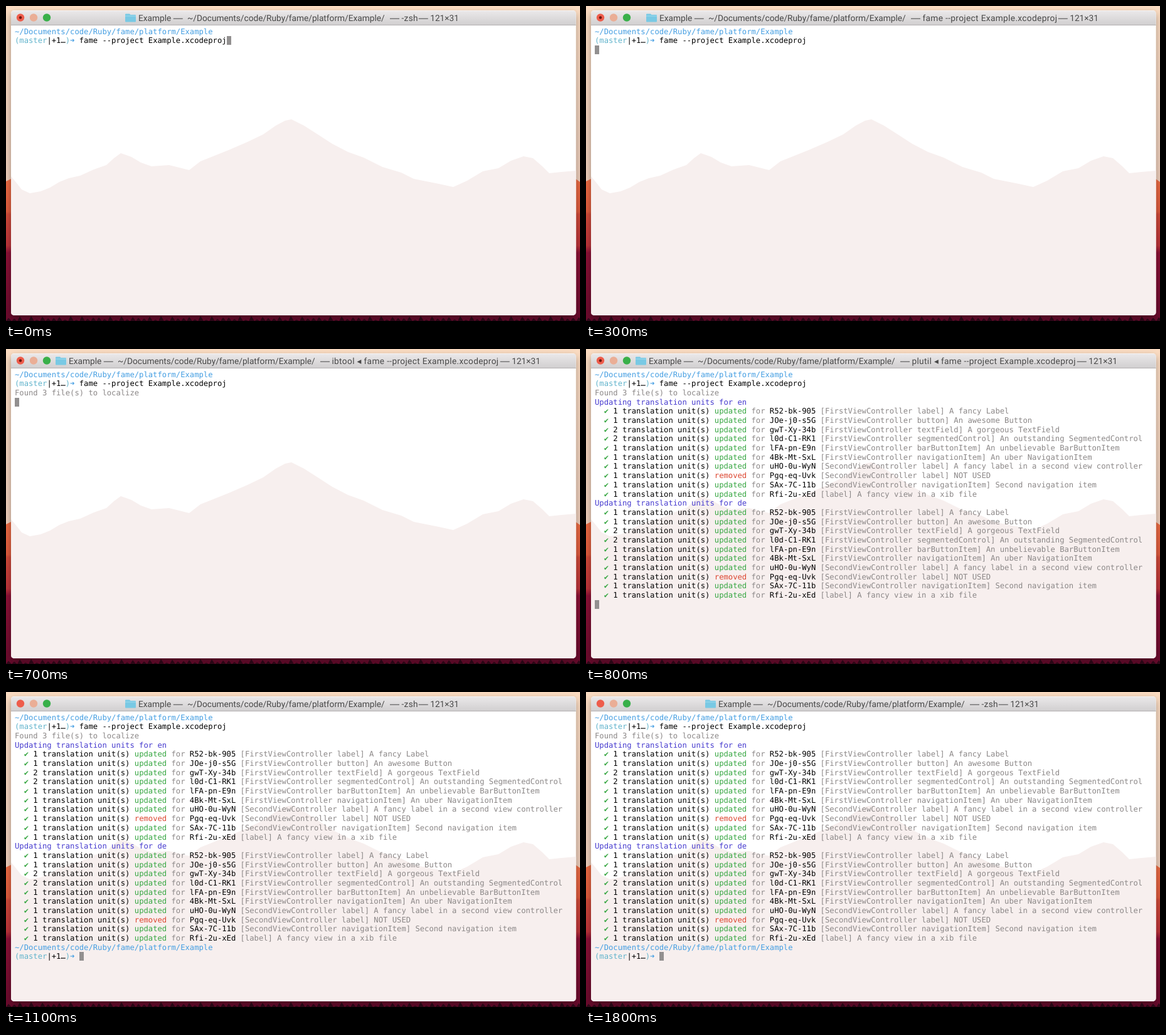
An HTML page for the animation above (2 s loop, 915 by 503 pixels).

```html
<!DOCTYPE html>
<html lang="en">
<head>
<meta charset="utf-8">
<style>
  html, body { margin: 0; width: 100%; height: 100%; overflow: hidden; }
  svg, pre { position: absolute; text-rendering: geometricPrecision; }
  svg { left: 0; top: 0; }
  svg text { font: 13.7px Roboto, sans-serif; fill: #484848; white-space: pre; }
  svg .dash { font: 15px "Liberation Sans", sans-serif; }
  pre {
    left: 14px; top: 33.6px; margin: 0; color: #000;
    font: 12.2px/14.68px "DejaVu Sans Mono", monospace;
  }
  .blue { color: #449ee2; }
  .cyan { color: #62b4cc; }
  .gray { color: #8b8787; }
  .head { color: #473ccf; }
  .green { color: #38a743; }
  .red { color: #dc4630; }
  .cursor { background: #929090; }
</style>
</head>
<body>
<svg width="915" height="503" viewBox="0 0 915 503">
  <defs>
    <linearGradient id="sky" x1="0" y1="0" x2="0" y2="1">
      <stop offset="0" stop-color="#fbdcc2"/>
      <stop offset=".4" stop-color="#efd0bc"/>
      <stop offset="1" stop-color="#e6c6b5"/>
    </linearGradient>
    <linearGradient id="hills" x1="0" y1="0" x2="0" y2="1">
      <stop offset="0" stop-color="#ec6c43"/>
      <stop offset=".23" stop-color="#dd5a3c"/>
      <stop offset=".25" stop-color="#cf4a38"/>
      <stop offset=".47" stop-color="#bb3339"/>
      <stop offset=".52" stop-color="#8c1136"/>
      <stop offset="1" stop-color="#690a2c"/>
    </linearGradient>
    <linearGradient id="bar" x1="0" y1="0" x2="0" y2="1">
      <stop offset="0" stop-color="#ebe9ea"/>
      <stop offset="1" stop-color="#d0cecf"/>
    </linearGradient>
    <filter id="shadow" x="-5%" y="-5%" width="110%" height="112%">
      <feDropShadow dx="0" dy="5" stdDeviation="6" flood-opacity=".35"/>
    </filter>
    <clipPath id="frame"><rect x="8" y="7" width="900.5" height="487" rx="5"/></clipPath>
  </defs>
  <rect width="915" height="503" fill="url(#sky)"/>
  <path d="M0 280L8 276H908L915 281V503H0Z" fill="url(#hills)"/>
  <path id="trees" fill="#300819"/>
  <rect x="8" y="7" width="900.5" height="487" rx="5" fill="#fff" filter="url(#shadow)"/>
  <g clip-path="url(#frame)">
    <path fill="#f7efee" d="M8 272L14 279 25 293 38 299 55 296 70 290 85 281 100 275 118 271 140 261
      160 254 172 243 183 235 200 241 215 250 232 256 260 254 292 262 310 248 330 240 355 230 385 217
      410 205 430 191 445 183 455 181 475 191 500 207 520 220 545 233 570 242 600 257 630 266 650 276
      690 284 713 289 735 279 760 264 785 259 805 247 825 240 840 243 855 256 866 267 885 265 909 263V494H8Z"/>
    <rect x="8" y="7" width="901" height="24" fill="url(#bar)"/>
    <path d="M8 30.5H909" stroke="#b4b1b2"/>
    <path d="M8 7.5H909" stroke="#f6f4f4"/>
  </g>
  <circle cx="23" cy="18.5" r="6.2" fill="#ee5d4c"/>
  <circle id="busy" cx="23" cy="18.5" r="2.2" fill="#6b1710"/>
  <circle cx="44" cy="18.5" r="6.2" fill="#eaae96"/>
  <circle cx="65" cy="18.5" r="6.2" fill="#39b04a"/>
  <g id="title">
    <path d="M-20 12.5H-14L-12.5 14H-5Q-4 14 -4 15V24.500Q-4 25.500 -5 25.500H-20Q-21 25.500 -21 24.500V13.500Q-21 12.500 -20 12.500Z" fill="#79c9e4"/>
    <path d="M-21 16H-4" stroke="#a4dcee"/>
    <text y="24">Example <tspan class="dash">—</tspan></text>
    <text x="78" y="24">~/Documents/code/Ruby/fame/platform/Example/</text>
    <text x="401" y="24"><tspan class="dash">—</tspan> <tspan id="command" letter-spacing=".35"></tspan></text>
    <text id="size" y="24" text-anchor="end"><tspan class="dash">—</tspan> 121×31</text>
  </g>
</svg>
<pre id="screen"></pre>
<script>
const $ = id => document.getElementById(id);
const paint = (color, text) => `<span class="${color}">${text}</span>`;

const command = 'fame --project Example.xcodeproj';
const path = paint('blue', '~/Documents/code/Ruby/fame/platform/Example');
const prompt = paint('cyan', '(master') + '|+1…' + paint('cyan', ')') + paint('blue', '➜') + ' ';
const cursor = paint('cursor', '&nbsp;');

const units = [
  'R52-bk-905 [FirstViewController label] A fancy Label',
  'JOe-j0-s5G [FirstViewController button] An awesome Button',
  'gwT-Xy-34b [FirstViewController textField] A gorgeous TextField',
  'l0d-C1-RK1 [FirstViewController segmentedControl] An outstanding SegmentedControl',
  'lFA-pn-E9n [FirstViewController barButtonItem] An unbelievable BarButtonItem',
  '4Bk-Mt-SxL [FirstViewController navigationItem] An uber NavigationItem',
  'uHO-0u-WyN [SecondViewController label] A fancy label in a second view controller',
  'Pgq-eq-Uvk [SecondViewController label] NOT USED',
  'SAx-7C-11b [SecondViewController navigationItem] Second navigation item',
  'Rfi-2u-xEd [label] A fancy view in a xib file'
].map((unit, i) => {
  const count = i === 2 || i === 3 ? 2 : 1;
  const action = i === 7 ? paint('red', 'removed') : paint('green', 'updated');
  return `  ${paint('green', '✔')} ${count} translation unit(s) ${action} ${paint('gray', 'for')} `
    + unit.slice(0, 10) + paint('gray', unit.slice(10));
});
const report = lang => [paint('head', 'Updating translation units for ' + lang), ...units];

const typed = [path, prompt + command];
const found = [...typed, paint('gray', 'Found 3 file(s) to localize')];
const updated = [...found, ...report('en'), ...report('de')];

// Title x, right edge of the title, running process, terminal lines
const states = [
  { from: 0, x: 211, end: 722, process: '-zsh', lines: [path, prompt + command + cursor] },
  { from: 200, x: 117, end: 817, process: command, lines: [...typed, cursor] },
  { from: 500, x: 100, end: 852, process: 'ibtool ◂ ' + command, lines: [...found, cursor] },
  { from: 800, x: 100, end: 847, process: 'plutil ◂ ' + command, lines: [...updated, cursor] },
  { from: 1000, x: 211, end: 722, process: '-zsh', lines: [...updated, path, prompt + cursor], idle: true }
];

let trees = 'M0 503';
for (let x = 0; x < 915; x += 9) {
  const top = 498 + 3 * Math.sin(x * 1.7);
  trees += `L${x + 4} ${top}L${x + 9} 503`;
}
$('trees').setAttribute('d', trees + 'Z');

let shown;
function draw() {
  const time = performance.now() % 2000;
  const state = states.findLast(s => s.from <= time);
  if (state !== shown) {
    shown = state;
    $('title').setAttribute('transform', `translate(${state.x})`);
    $('size').setAttribute('x', state.end - state.x);
    $('command').textContent = state.process;
    $('busy').style.display = state.idle ? 'none' : '';
    $('screen').innerHTML = state.lines.join('\n');
  }
  requestAnimationFrame(draw);
}
draw();
</script>
</body>
</html>
```
